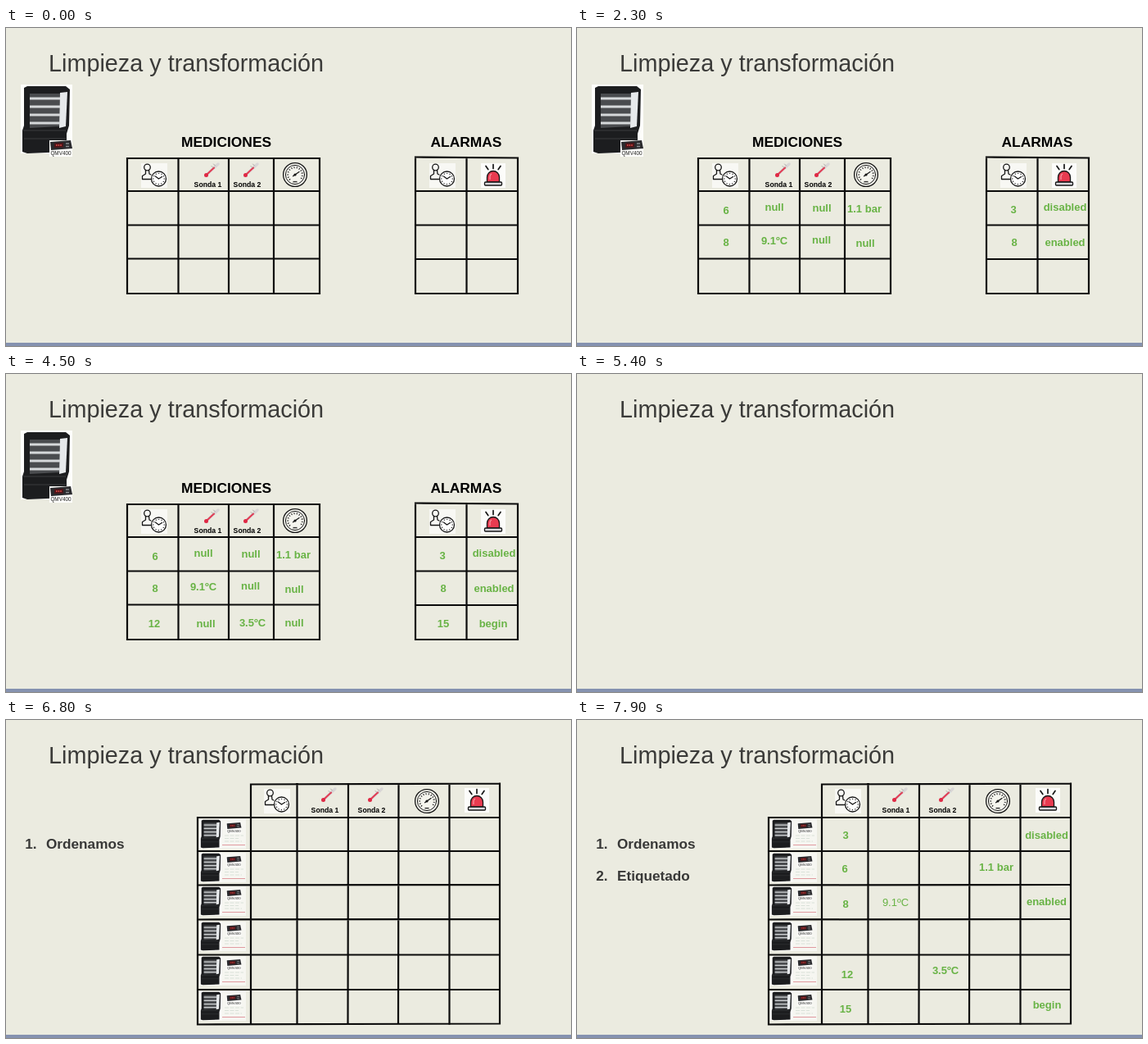
Recreate the animation shown at these times as an HTML page. Size 690 by 388 pixels, loop 8000 ms.

```html
<!DOCTYPE html>
<html lang="es">
<head>
<meta charset="utf-8">
<title>Limpieza y transformación</title>
<style>
html, body { margin: 0; width: 100%; height: 100%; overflow: hidden; background: #ebebe0; }
svg { display: block; width: 690px; height: 388px; font-family: "Liberation Sans", Arial, sans-serif; }
.head { font-size: 17.4px; font-weight: bold; text-anchor: middle; }
.sonda { font-size: 8.7px; font-weight: bold; text-anchor: middle; }
.value { font-size: 13px; font-weight: bold; fill: #68b345; text-anchor: middle; }
.item { font-size: 17.2px; font-weight: bold; fill: #383837; }
.grid { fill: none; stroke: #0b0b0b; stroke-width: 2.2; stroke-linecap: square; }
.ink { fill: none; stroke: #161616; stroke-width: 1.3; stroke-linecap: round; stroke-linejoin: round; }
</style>
</head>
<body>
<svg viewBox="0 0 690 388">
  <defs>
    <g id="clock">
      <rect width="32" height="30" fill="#f8f8f4"/>
      <path class="ink" d="M5.500 8.500 5.500 13 1.500 15.500v4h10M9.500 8.500l.5 4.500 2 1"/>
      <circle class="ink" cx="7.5" cy="5" r="3.8"/>
      <circle class="ink" cx="21.5" cy="19" r="9" style="fill:#fff"/>
      <circle class="ink" cx="21.5" cy="19" r="6.7" stroke-dasharray=".1 3.4"/>
      <path class="ink" d="M17.500 16l4 3 4-2.500"/>
    </g>
    <g id="thermo" stroke-linecap="round">
      <path d="M4 15 18 2" stroke="#d9d6d6" stroke-width="3.4"/>
      <path d="M4 15 13 6.500" stroke="#e23a52" stroke-width="2"/>
      <path d="M10 4.500l2 2M12.500 2l2 2" stroke="#999" stroke-width=".8"/>
      <circle cx="3.5" cy="15.5" r="2.5" fill="#df2945"/>
    </g>
    <g id="gauge">
      <circle class="ink" r="14.4" style="fill:#f5f5ee"/>
      <circle class="ink" r="11.6" style="stroke-width:1"/>
      <path class="ink" d="M-6.200 6.200A8.800 8.800 0 1 1 6.200 6.200" style="stroke-width:2;stroke-linecap:butt" stroke-dasharray="1 2.200"/>
      <path class="ink" d="M-2.500 1.700 5-3.500"/>
      <circle r="1.6" fill="#161616"/>
      <path d="M-2.500 8.600h5" stroke="#333" stroke-width="1.5"/>
    </g>
    <g id="siren">
      <rect width="30" height="30" fill="#fcfcfa"/>
      <path class="ink" d="M15 1.500v5M6 3.500 8.800 7.500M24 3.500 21.200 7.500" style="stroke-width:1.7"/>
      <path class="ink" d="M7.500 23v-6a7.500 7.500 0 0 1 15 0v6z" style="fill:#e83b50"/>
      <path d="M11 20v-4a4 4 0 0 1 2-3" fill="none" stroke="#f79aa5" stroke-width="1.2"/>
      <rect class="ink" x="4.5" y="23" width="21" height="4" rx="1" style="fill:#d9d9dc"/>
    </g>
    <g id="fridge">
      <path fill="#fdfdfb" d="M0 0h63v84H0z"/>
      <path fill="#1c1d1f" d="M4 4 8 2h47l5 4-1 44-3 10v22L8 84 2 82V56l2-6z"/>
      <path fill="#4a4c4f" d="M11 11h37l-1 40-36 2z"/>
      <path fill="#e6e9eb" d="M48 10l9-1-2 42-8 2z"/>
      <path d="M11 17h37M11 27h37M11 37h37M11 47h37" stroke="#d5d8da" stroke-width="3"/>
      <path d="M3 56h52M4 66h51" stroke="#3a3c3f" stroke-width="1.200"/>
    </g>
    <g id="panel">
      <rect width="28" height="20" fill="#fdfdfb"/>
      <path fill="#2b2b2e" d="M1 2 26 0l2 10-26 2z"/>
      <path fill="#4d1519" d="M6 3.500 17 3v5.500L6 9z"/>
      <path d="M8 6h7" stroke="#c8403c" stroke-width="2" stroke-dasharray="1.600 1"/>
      <path d="M20 4h4M20 7.500h4" stroke="#8a8d90" stroke-width="1.3"/>
      <text x="14" y="18.3" font-size="6.4" text-anchor="middle" fill="#222">QMV400</text>
    </g>
    <g id="unit">
      <path fill="#f6f6f1" d="M0 0h57v36H0z"/>
      <use href="#fridge" transform="translate(1 0) scale(.42)"/>
      <use href="#panel" transform="translate(33 4) scale(.66)"/>
      <path d="M31 20h23M31 23.500h17M31 27h21" stroke="#d9e1d8" stroke-width="1" stroke-dasharray="5 1.500"/>
      <path d="M28 31.500h28" stroke="#e09aa0" stroke-width="1"/>
    </g>
  </defs>

  <rect width="690" height="388" fill="#ebebe0"/>
  <rect y="384" width="690" height="4" fill="#8592b0"/>
  <text x="52" y="53" font-size="28.8" fill="#3b3b39">Limpieza y transformación</text>

  <g id="split">
    <use href="#fridge" x="18" y="69"/>
    <use href="#panel" x="53" y="137"/>
    <text class="head" x="269" y="145">MEDICIONES</text>
    <text class="head" x="562" y="145">ALARMAS</text>
    <use href="#clock" x="165" y="165"/>
    <use href="#thermo" x="241" y="164"/>
    <use href="#thermo" x="289" y="164"/>
    <text class="sonda" x="246.5" y="194">Sonda 1</text>
    <text class="sonda" x="294.5" y="194">Sonda 2</text>
    <use href="#gauge" x="353" y="179"/>
    <use href="#clock" x="517" y="165"/>
    <use href="#siren" x="580" y="165"/>
    <path class="grid" d="M148 159H383M148 199H383M148 240.500H383M148 281.500H383M148 324H383M148 159V324M210.500 159V324M272 159V324M327 159V324M383 159V324"/>
    <path class="grid" d="M500 157.500 625 158.500M500 199H625M500 240.500H625M500 282H625M500 324H625M500 157.500V324M562.500 158V324M625 158.500V324"/>
    <g id="row1"></g><g id="nulls"></g><g id="row2"></g><g id="row3"></g>
  </g>

  <g id="merged">
    <g id="units"></g>
    <use href="#clock" x="315" y="84"/>
    <use href="#thermo" x="384" y="82"/>
    <use href="#thermo" x="441" y="82"/>
    <text class="sonda" x="389.5" y="113">Sonda 1</text>
    <text class="sonda" x="446.5" y="113">Sonda 2</text>
    <use href="#gauge" x="514" y="99"/>
    <use href="#siren" x="560" y="83"/>
    <path class="grid" d="M299 78.500 603 77.500M234 119H603M234 160H603M234 201.500 603 201M234 243.500 603 243M234 286.500H603M234 329H603M234 371.500 603 370.500M234 119V371.500M299 78.500V371M355.500 78V371M418 78 417.500 371M479.500 78 479 371M541.500 78V371M603 77.500V370.500"/>
  </g>
  <g id="sorted"></g>
  <g id="step1" class="item"><text x="23.3" y="157">1.</text><text x="49" y="157">Ordenamos</text></g>
  <g id="step2" class="item"><text x="23.3" y="196">2.</text><text x="49" y="196">Etiquetado</text></g>
</svg>
<script>
const byId = id => document.getElementById(id);

// Each entry: text, centre x, middle y, optional weight
const values = {
  row1: [['6', 182, 223], ['1.1 bar', 351, 221], ['3', 533, 222], ['disabled', 596, 219]],
  nulls: [['null', 241, 219], ['null', 299, 220]],
  row2: [['8', 182, 262], ['9.1ºC', 241, 259.5], ['null', 298.5, 259], ['null', 352, 262.5], ['8', 534, 262], ['enabled', 596, 262]],
  row3: [['12', 181, 305], ['null', 244, 305], ['3.5ºC', 301, 304], ['null', 352, 304], ['15', 534, 305], ['begin', 595, 305]],
  sorted: [['3', 328, 141], ['disabled', 573.5, 141], ['6', 327, 182], ['1.1 bar', 512, 180], ['8', 328, 225],
    ['9.1ºC', 389, 223, 'normal'], ['enabled', 573.5, 222], ['12', 330, 311], ['3.5ºC', 450, 306], ['15', 328, 353], ['begin', 574, 348]]
};
for (const id in values) {
  byId(id).innerHTML = values[id].map(([text, x, y, weight = 'bold']) =>
    `<text class="value" x="${x}" y="${y + 4.2}" style="font-weight:${weight}">${text}</text>`).join('');
}
byId('units').innerHTML = [121, 162, 203, 246, 288, 331].map(y => `<use href="#unit" x="236" y="${y}"/>`).join('');

// Fade-in start and end in ms
const fades = {
  row1: [300, 600], nulls: [1200, 1700], row2: [1800, 2300], row3: [2500, 3000],
  merged: [5600, 6200], step1: [6500, 6800], sorted: [6800, 7400], step2: [7400, 7900]
};

function draw(now) {
  const t = Math.floor(now % 8000 / 100) * 100;
  byId('split').style.display = t < 4600 ? '' : 'none';
  for (const id in fades) {
    const [start, end] = fades[id];
    byId(id).style.opacity = Math.min(1, Math.max(0, (t - start) / (end - start)));
  }
  requestAnimationFrame(draw);
}
draw(performance.now());
</script>
</body>
</html>
```
